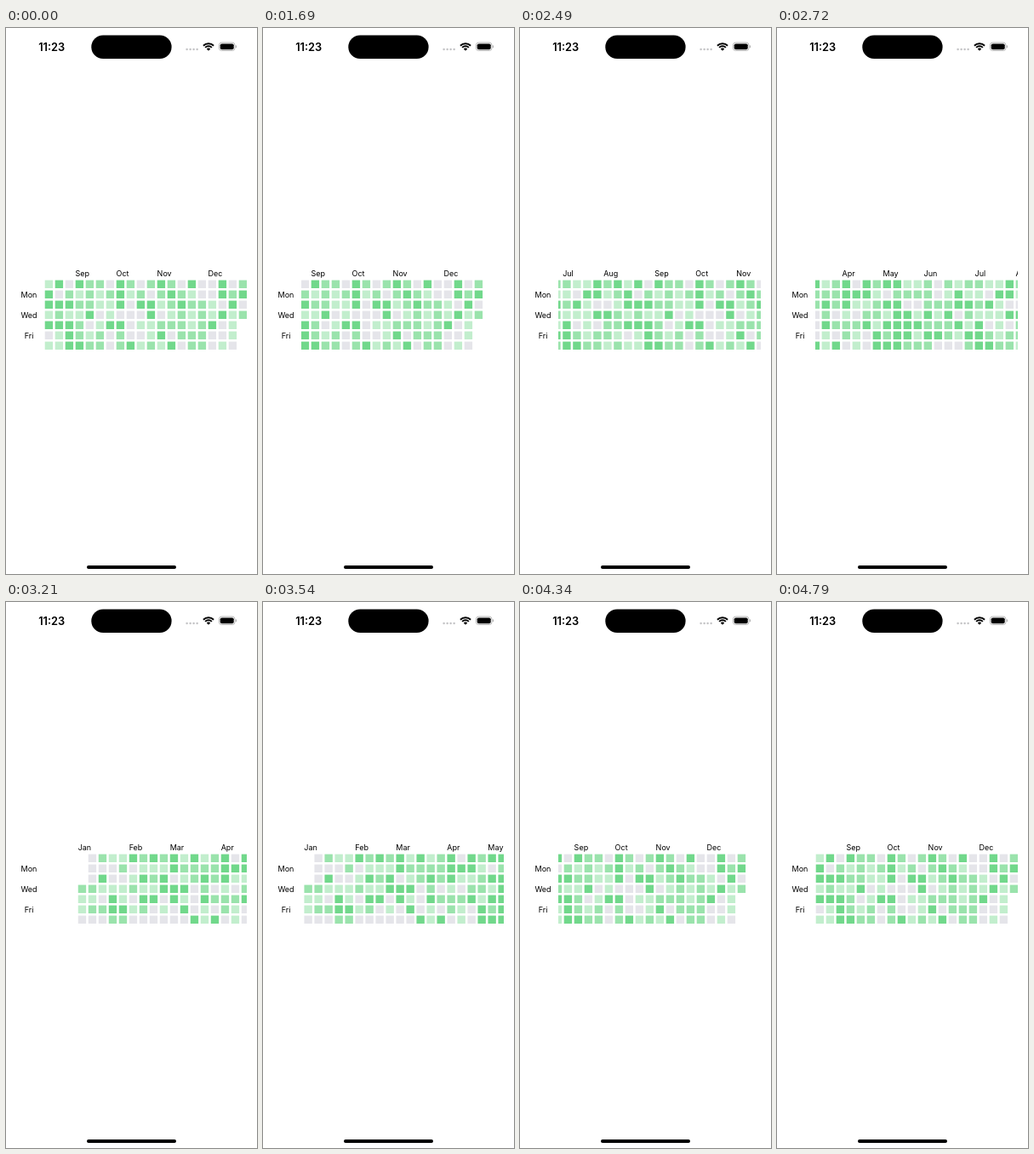
An HTML page with a canvas that plays this animation: 295x640 px, repeating every 8.17 s.

```html
<!DOCTYPE html>
<html lang="en">
<head>
<meta charset="utf-8">
<title>Activity calendar</title>
<style>
  html, body { margin: 0; width: 100%; height: 100%; overflow: hidden; background: #fff; }
  canvas { display: block; width: 295px; height: 640px; }
</style>
</head>
<body>
<canvas id="stage"></canvas>
<script>
const W = 295, H = 640, LOOP = 8170;
const FONT = 'Inter, Roboto, "Liberation Sans", sans-serif';
const PITCH = 12, CELL = 9.4, TOP = 295.6;
const VIEW = { x: 45, y: 280, w: 238, h: 100 };
const START = 46, END = -350, STIFF = 0.0109;
const COLORS = ['#e5e5ea', '#c2eecd', '#9ae3ac', '#71d88b'];
const MONTHS = { Jan: 0, Feb: 5, Mar: 9, Apr: 14, May: 18, Jun: 22,
                 Jul: 27, Aug: 31, Sep: 36, Oct: 40, Nov: 44, Dec: 49 };

// Activity levels of the latest weeks, one row per weekday
const RECENT_FROM = 33, WEEKS = 53;
const RECENT = [
  [1, 3, 0, 3, 2, 2, 0, 3, 2, 0, 2, 3, 2, 0, 3, 0, 0, 3, 0, 2],
  [3, 0, 2, 1, 2, 1, 2, 3, 1, 2, 0, 2, 3, 2, 1, 0, 0, 3, 2, 3],
  [3, 3, 3, 2, 2, 1, 1, 3, 0, 3, 3, 1, 2, 3, 2, 2, 1, 0, 3, 0],
  [1, 2, 1, 1, 3, 0, 1, 0, 0, 0, 3, 0, 1, 2, 1, 2, 1, 3, 1, 2],
  [3, 3, 3, 2, 0, 1, 3, 3, 0, 1, 1, 2, 2, 2, 1, 2, 3, 0, 1],
  [0, 1, 3, 2, 1, 2, 0, 2, 0, 0, 1, 3, 0, 2, 2, 2, 0, 0, 1],
  [1, 1, 3, 3, 2, 2, 0, 2, 3, 1, 2, 1, 3, 0, 2, 2, 0, 1, 0]
];

// Moments at which the screen refreshes
const TICKS = [0, 1690, 1800, 1920, 2040, 2150, 2370, 2490, 2610, 2720, 2840,
  2980, 3090, 3210, 3330, 3440, 3540, 3780, 3890, 4010, 4130, 4240, 4340, 4440,
  4540, 4660, 4790];

const canvas = document.getElementById('stage');
const ctx = canvas.getContext('2d');
const dpr = window.devicePixelRatio || 1;
canvas.width = W * dpr;
canvas.height = H * dpr;

function random(seed) {
  let n = Math.imul(seed + 17, 0x9e3779b1);
  n = Math.imul(n ^ (n >>> 15), 0x85ebca6b);
  return ((n ^ (n >>> 13)) >>> 0) / 4294967296;
}

function level(week, day) {
  if (week >= RECENT_FROM) return RECENT[day][week - RECENT_FROM];
  if (week === 0 && day < 3) return undefined;
  return Math.floor(random(week * 7 + day) * 4);
}

const smooth = p => p * p * (3 - 2 * p);
// Critically damped return from rest, and after an impact
const relax = u => (1 + STIFF * u) * Math.exp(-STIFF * u);
const bounce = (speed, u) => speed * u * Math.exp(-STIFF * u);

// Left edge of the first week
function scroll(t) {
  if (t < 1690 || t >= 4790) return END;
  if (t < 2278) return END - 25 * relax(Math.min(t, 2150) - 1690);
  if (t < 3090) return -351 + 459 * smooth((t - 2278) / 812);
  if (t < 3700) return START + 62.6 * relax(Math.min(t, 3540) - 3090);
  if (t < 4020) return 49 - 381 * Math.pow((t - 3700) / 310, 1.5);
  return END - bounce(1.84, t - 4020);
}

function pill(x, y, w, h, r, color) {
  ctx.fillStyle = color;
  ctx.beginPath();
  ctx.roundRect(x, y, w, h, r);
  ctx.fill();
}

function label(text, x, y, align = 'left', font = '9px') {
  ctx.font = font + ' ' + FONT;
  ctx.textAlign = align;
  ctx.fillStyle = '#000';
  ctx.fillText(text, x, y);
}

function wifi(x, y) {
  ctx.strokeStyle = '#000';
  ctx.lineWidth = 1.9;
  for (const r of [8.6, 5.5]) {
    ctx.beginPath();
    ctx.arc(x, y, r, -Math.PI * 0.75, -Math.PI * 0.25);
    ctx.stroke();
  }
  ctx.fillStyle = '#000';
  ctx.beginPath();
  ctx.moveTo(x, y);
  ctx.arc(x, y, 3.2, -Math.PI * 0.75, -Math.PI * 0.25);
  ctx.fill();
}

function battery(x, y) {
  ctx.strokeStyle = '#a6a6a6';
  ctx.lineWidth = 0.8;
  ctx.beginPath();
  ctx.roundRect(x, y, 18.6, 9.4, 3);
  ctx.stroke();
  pill(x + 1.3, y + 1.3, 16, 6.8, 1.9, '#000');
  pill(x + 19.5, y + 3.2, 1, 3, 0.5, '#a6a6a6');
}

function drawPhone() {
  label('11:23', 53.7, 26.6, 'center', '600 12.8px');
  pill(100.3, 8.5, 94.3, 27.6, 13.8, '#000');
  for (let i = 0; i < 4; i++) pill(211.4 + i * 4, 23.8, 2.5, 2.5, 1.25, '#c4c4c6');
  wifi(238, 26.8);
  battery(250.4, 17.1);
  pill(95, 630, 105, 4, 2, '#000');
}

function drawCalendar(left) {
  label('Mon', 27, 315.6, 'center');
  label('Wed', 27, 339.6, 'center');
  label('Fri', 27, 363.6, 'center');

  ctx.save();
  ctx.beginPath();
  ctx.rect(VIEW.x, VIEW.y, VIEW.w, VIEW.h);
  ctx.clip();
  for (const name in MONTHS) label(name, left + MONTHS[name] * PITCH - 0.4, 290.6);
  for (let week = 0; week < WEEKS; week++) {
    const x = left + week * PITCH - 0.3;
    if (x + CELL < VIEW.x || x > VIEW.x + VIEW.w) continue;
    for (let day = 0; day < 7; day++) {
      const value = level(week, day);
      if (value === undefined) continue;
      ctx.fillStyle = COLORS[value];
      ctx.fillRect(x, TOP + day * PITCH, CELL, CELL);
    }
  }
  ctx.restore();
}

function draw(now) {
  const t = now % LOOP;
  const tick = TICKS.filter(v => v <= t).pop();
  ctx.setTransform(dpr, 0, 0, dpr, 0, 0);
  ctx.fillStyle = '#fff';
  ctx.fillRect(0, 0, W, H);
  drawPhone();
  drawCalendar(scroll(tick));
}

const begin = performance.now();
function loop() {
  draw(Math.max(0, performance.now() - begin));
  requestAnimationFrame(loop);
}
loop();
</script>
</body>
</html>
```
